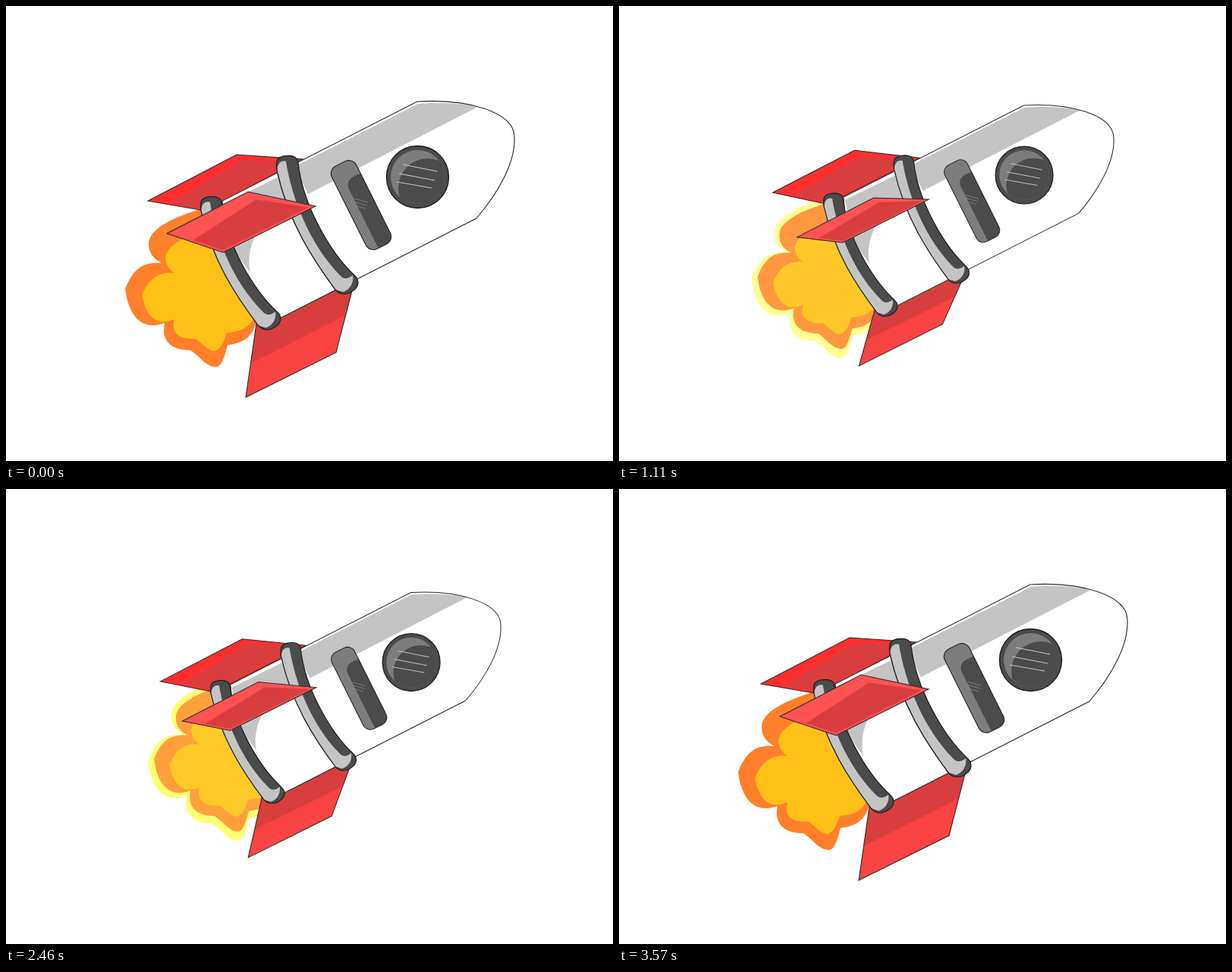
Write an HTML page with a canvas that moves like this. It is 800 by 600 pixels and loops after 3.6 s.

```html
<!DOCTYPE html>
<html lang="en">
<head>
<meta charset="utf-8">
<title>Rocket</title>
<style>
html, body { margin: 0; width: 100%; height: 100%; overflow: hidden; background: #fff; }
canvas { display: block; }
</style>
</head>
<body>
<canvas id="stage" width="800" height="600"></canvas>
<script>
const ctx = document.getElementById('stage').getContext('2d');
const LOOP = 3600, LAST = 3570;
const INK = '#2b2b2b', DARK = '#4b4b4b', MID = '#7d7d7d', LIGHT = '#c4c4c4', SHADE = '#d83e3e';

const body = new Path2D('M542 126 C610 122 669 140 670 172 C672 205 650 245 620 280 L345 420 C320 390 290 330 285 257 Z');
const noseShade = new Path2D('M380 212 L543 129 C575 127 600 128 622 133 L398 248 Z');
const tailShade = new Path2D('M287 261 L360 225 L378 258 C340 275 314 310 322 352 L300 322 Z');
const ring = new Path2D('M357 217 C355 203 358 200 366 198 C376 196 384 198 385 207 C391 262 427 325 460 356 C466 362 465 370 458 375 C450 381 441 382 434 374 C405 335 372 285 357 217 Z');
const ringShine = new Path2D('M357 221 C357 209 361 203 369 205 C377 255 401 315 440 355 C445 361 451 360 457 355 C459 366 452 375 444 377 L434 374 C405 335 372 285 357 221 Z');
const flame = new Path2D('M262 266 C215 280 188 295 188 314 C188 326 195 334 205 339 C182 337 168 345 157 373 C161 405 176 430 209 418 C204 440 216 454 243 454 C257 463 263 476 277 476 C284 476 288 462 292 447 C312 445 326 436 330 415 L300 340 Z');
const flameCore = new Path2D('M255 298 C225 308 210 320 210 334 C212 344 216 348 222 352 C202 350 189 358 179 381 C184 408 198 424 222 413 C217 430 226 440 250 439 C259 445 266 455 275 455 C284 452 287 442 291 431 C308 430 322 424 327 410 L300 330 Z');

const TAU = Math.PI * 2;
const lerp = (a, b, u) => a + (b - a) * u;
const mix = (p, q, u) => p.map((v, i) => lerp(v, q[i], u));
const rgb = c => `rgb(${c.map(Math.round).join(',')})`;

// Eases from stop to stop, each being [progress, value]
function ease(stops, p) {
  const i = Math.max(1, stops.findIndex(s => s[0] >= p));
  const [from, a] = stops[i - 1], [to, b] = stops[i];
  const u = (p - from) / (to - from);
  return lerp(a, b, u * u * (3 - 2 * u));
}

const finSwing = p => ease([[0, 0], [.19, 1], [.31, 1], [.5, -.12], [.8, 1], [1, 0]], p);
const flameHeat = p => ease([[0, 0], [.12, 1], [.32, .42], [.52, .32], [.7, .55], [1, 0]], p);
const flameSlide = p => 6.1 * (1 - Math.cos(8 * TAU * p))
  + 3.5 * (Math.sin(9 * TAU * p) + Math.sin(12 * TAU * p));

function rocketPose(p) {
  const far = 1 - Math.abs(2 * p - 1);
  return {
    scale: 1 - .065 * far - .09 * far * far,
    dx: 2.7 * Math.sin(TAU * p) ** 2,
    dy: -7.7 * Math.sin(Math.PI * p) ** 2 - 3 * Math.sin(TAU * p)
  };
}

function paint(path, fill, line, width = 1) {
  if (fill) { ctx.fillStyle = fill; ctx.fill(path); }
  if (line) { ctx.strokeStyle = line; ctx.lineWidth = width; ctx.stroke(path); }
}

function poly(points) {
  const p = new Path2D();
  points.forEach(([x, y]) => p.lineTo(x, y));
  p.closePath();
  return p;
}

function disc(x, y, r) {
  const p = new Path2D();
  p.arc(x, y, r, 0, TAU);
  return p;
}

function lines(list, color, width) {
  const p = new Path2D();
  for (const [x, y, x2, y2] of list) { p.moveTo(x, y); p.lineTo(x2, y2); }
  paint(p, null, color, width);
}

// Draws with the given point moved and scaled
function placed(x, y, sx, sy, px, py, drawing) {
  ctx.save();
  ctx.translate(x, y);
  ctx.scale(sx, sy);
  ctx.translate(-px, -py);
  drawing();
  ctx.restore();
}

function sideFin(rest, swung, swing, color, inset) {
  const [a, b, c, d] = rest.map((p, i) => mix(p, swung[i], swing));
  const spot = (u, v) => mix(mix(a, b, u), mix(d, c, u), v);
  const shape = poly([a, b, c, d]);
  paint(shape, color);
  paint(poly([spot(.03, inset), spot(.9, inset * .58), spot(.96, .95), spot(.03, .95)]), SHADE);
  paint(shape, null, INK, 1.1);
}

function lowerFin(swing) {
  const a = mix([316, 516], [307, 497.6], swing), b = mix([435, 457], [426, 438.2], swing);
  const c = [459, 364], d = [331, 412];
  const shape = poly([a, b, c, d]);
  paint(shape, '#fa4343');
  paint(poly([mix(a, d, .43), mix(b, c, .53), c, d]), SHADE);
  paint(shape, null, INK, 1.1);
}

function drawFlame(p) {
  const slide = flameSlide(p), heat = flameHeat(p), pale = heat * (1 - heat);
  const tint = (cold, hot, wash) => {
    const [r, g, b] = mix(cold, hot, heat);
    return rgb([r, g, b + wash * pale]);
  };
  ctx.save();
  ctx.translate(slide, -slide / 2);
  if (heat > 0) {
    placed(290, 345, 1.065, 1.1, 290, 345, () => paint(flame, rgb([255, 255, 255 * (1 - heat)])));
  }
  paint(flame, tint([255, 127, 42], [255, 187, 32], 100));
  paint(flameCore, tint([255, 192, 24], [255, 208, 26], 62));
  ctx.restore();
}

function drawRing() {
  paint(ring, DARK);
  paint(ringShine, LIGHT);
  paint(ring, null, '#1e1e1e', 1.3);
}

function drawPanel() {
  const edge = new Path2D(), front = new Path2D();
  edge.roundRect(-18, -61, 36, 122, 11);
  front.roundRect(-5, -38, 23, 99, [12, 2, 11, 2]);
  ctx.save();
  ctx.translate(468, 262.5);
  ctx.rotate(-.463);
  paint(edge, MID);
  paint(front, DARK);
  paint(edge, null, INK, 1.2);
  ctx.restore();
  lines([[459, 254, 477, 259], [458, 258, 476, 263], [457, 262, 474, 267]], '#8c8c8c', .8);
}

function drawWindow() {
  ctx.save();
  paint(disc(542.5, 225.5, 41), DARK, '#1e1e1e', 1.4);
  const pane = disc(542.5, 225.5, 35.5);
  paint(pane, MID);
  ctx.clip(pane);
  paint(disc(556, 240, 39), DARK);
  ctx.restore();
  lines([[523, 209, 568, 218], [518, 221, 565, 230], [515, 232, 561, 240]], '#c8c8c8', 1);
}

function drawRocket(p) {
  const swing = finSwing(p);
  drawFlame(p);
  sideFin([[187, 257], [304, 196], [391, 202], [262, 270]],
    [[184, 250.3], [300.6, 190], [394, 201], [262, 267]], swing, '#ff2e2e', .35);
  lowerFin(swing);
  paint(body, '#fff');
  paint(noseShade, LIGHT);
  paint(tailShade, LIGHT);
  paint(body, null, INK, 1.1);
  drawRing();
  placed(257, 251, .98, .962, 357, 197, drawRing);
  drawPanel();
  drawWindow();
  sideFin([[212, 300], [319, 245], [408, 264], [286, 325]],
    [[218.6, 314], [327.6, 258], [406.5, 260], [283.4, 321.6]], swing, '#ff5252', .42);
}

function tick() {
  const p = Math.min(performance.now() % LOOP / LAST, 1);
  const { scale, dx, dy } = rocketPose(p);
  ctx.fillStyle = '#fff';
  ctx.fillRect(0, 0, 800, 600);
  placed(400 + dx, 300 + dy, scale, scale, 400, 300, () => drawRocket(p));
  requestAnimationFrame(tick);
}
tick();
</script>
</body>
</html>
```
